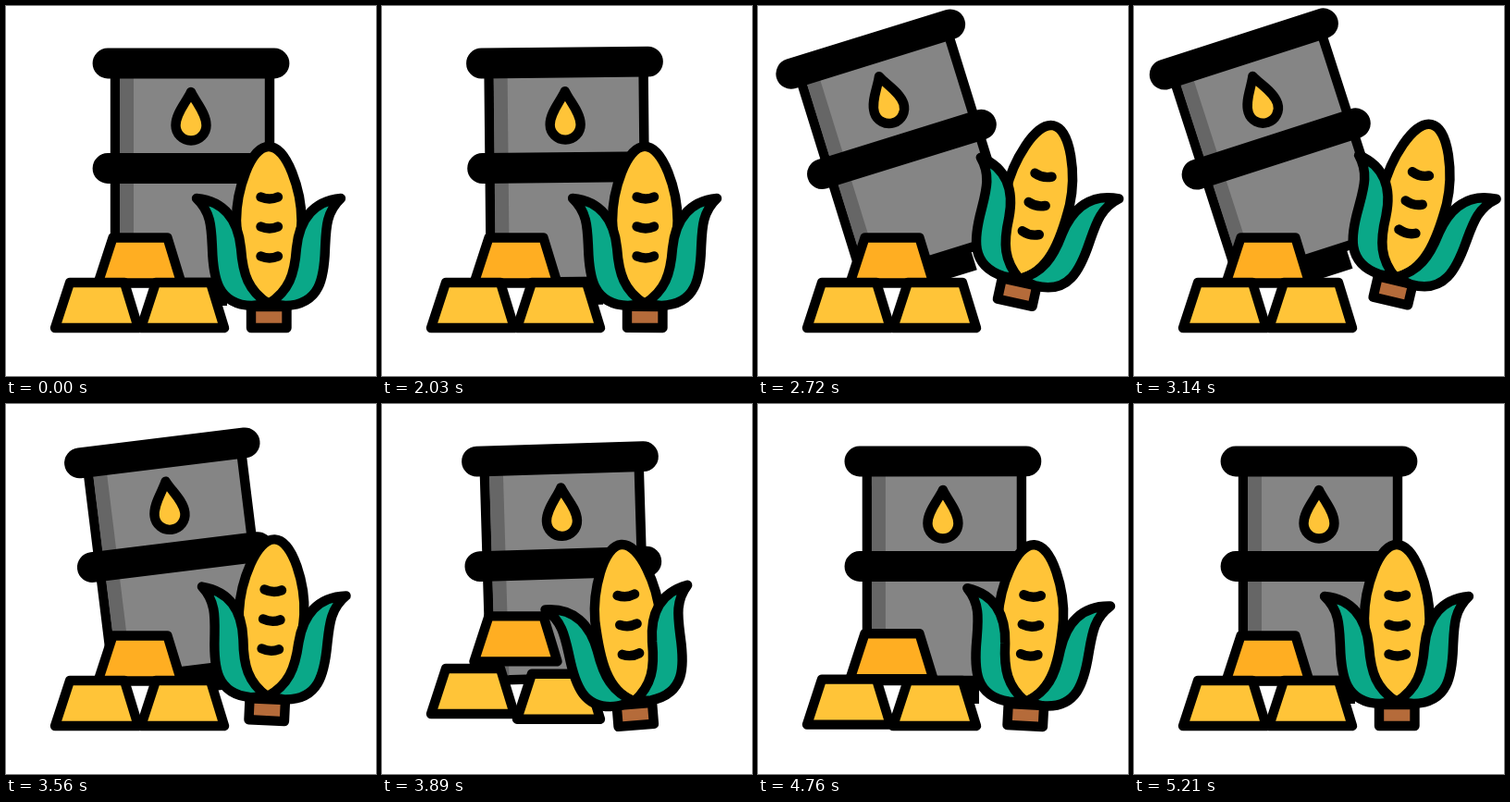
Recreate the animation shown at these times as an HTML page. Size 400 by 400 pixels, loop 5.24 s.

```html
<!DOCTYPE html>
<html lang="en">
<head>
<meta charset="utf-8">
<title>Commodities</title>
<style>
  html, body { margin: 0; width: 100%; height: 100%; overflow: hidden; background: #fff; }
  svg { display: block; width: 100vw; height: 100vh; }
</style>
</head>
<body>
<svg viewBox="0 0 400 400" stroke="#000" stroke-width="10.400" stroke-linecap="round" stroke-linejoin="round">
  <defs>
    <path id="bar" d="M16 0H75L90 49H0Z"/>
    <path id="leaf" d="M206 208C222 223 222 240 223 262C224 293 228 323 266 324L284 322C262 308 256 290 254 262C251 232 237 211 206 208Z"/>
  </defs>

  <g id="barrel">
    <path d="M118 62H285V299H118Z" fill="#858585"/>
    <path d="M123 70H138V294H123Z" fill="#666" stroke="none"/>
    <path d="M110 62H290M110 175.500H290" stroke-width="32.800" fill="none"/>
    <path d="M190 310H239" stroke-width="28" stroke-linecap="butt"/>
    <path d="M200 93C195 104 183.500 116 183.500 129A16.500 16.500 0 0 0 216.500 129C216.500 116 205 104 200 93Z" fill="#ffc438"/>
  </g>

  <use id="top" href="#bar" fill="#ffae22"/>
  <use id="left" href="#bar" fill="#ffc438"/>
  <use id="right" href="#bar" fill="#ffc438"/>

  <g id="corn">
    <rect x="265" y="325" width="38.500" height="23" fill="#b56b3a"/>
    <path d="M284 152C264 152 249 200 249 232C251 275 256 308 284 322C312 308 318 275 319.500 232C319.500 200 304 152 284 152Z" fill="#ffc438"/>
    <path d="M275.500 206.500q9.500 4 18.500 0m-18.500 32q9.500 4 18.500 0m-18.500 32q9.500 4 18.500 0" fill="none"/>
    <g id="leaves" fill="#0aa888">
      <use href="#leaf"/>
      <use href="#leaf" transform="translate(568) scale(-1 1)"/>
    </g>
  </g>
</svg>

<script>
const LOOP = 5240, START = 2030, STEP = 30;
const place = (id, transform) => document.getElementById(id).setAttribute("transform", transform);

// Critically damped approach from 0 to 1
function settle(elapsed, tau) {
  const x = Math.max(0, elapsed / tau);
  return 1 - (1 + x) * Math.exp(-x);
}

// One fading swing, first to the left, then to the right
function sway(t) {
  const u = Math.min(1, Math.max(0, (t - 3540) / 1500));
  return -Math.sin(2 * Math.PI * u) * (1.2 - .8 * u);
}

// Quick rise and slow fall
function hop(t, duration) {
  const u = Math.min(1, Math.max(0, (t - 3600) / duration));
  return Math.sin(Math.PI * Math.sqrt(u)) ** 2;
}

function draw(time) {
  const t = time < START ? 0 : Math.min(5210, START + Math.floor((time - START) / STEP) * STEP);

  const lean = settle(t - 1990, 144) * (1 - settle(t - 3200, 175));
  place("barrel", `rotate(${-17.95 * lean} 110 312)`);

  // The corn follows the barrel, then swings; tilt and leaves trail behind
  const lift = lean ** 1.7;
  const x = 11.5 * sway(t) - lift;
  const tilt = 13.2 * lift + 5.1 * sway(t - 80);
  const swing = 4.6 * lift + 6.7 * sway(t - 160);
  place("corn", `translate(${x} ${-28.5 * lift}) rotate(${tilt} 284 322)`);
  place("leaves", `rotate(${swing} 284 318)`);

  place("top", `translate(99.5 ${250.5 - 21.7 * hop(t, 1450)})`);
  place("left", `translate(53 ${299 - 13.3 * hop(t, 1450)})`);
  place("right", `translate(146 ${299 - 8.5 * hop(t, 750)})`);
}

const began = performance.now();
function tick() {
  draw((performance.now() - began) % LOOP);
  requestAnimationFrame(tick);
}
tick();
</script>
</body>
</html>
```
